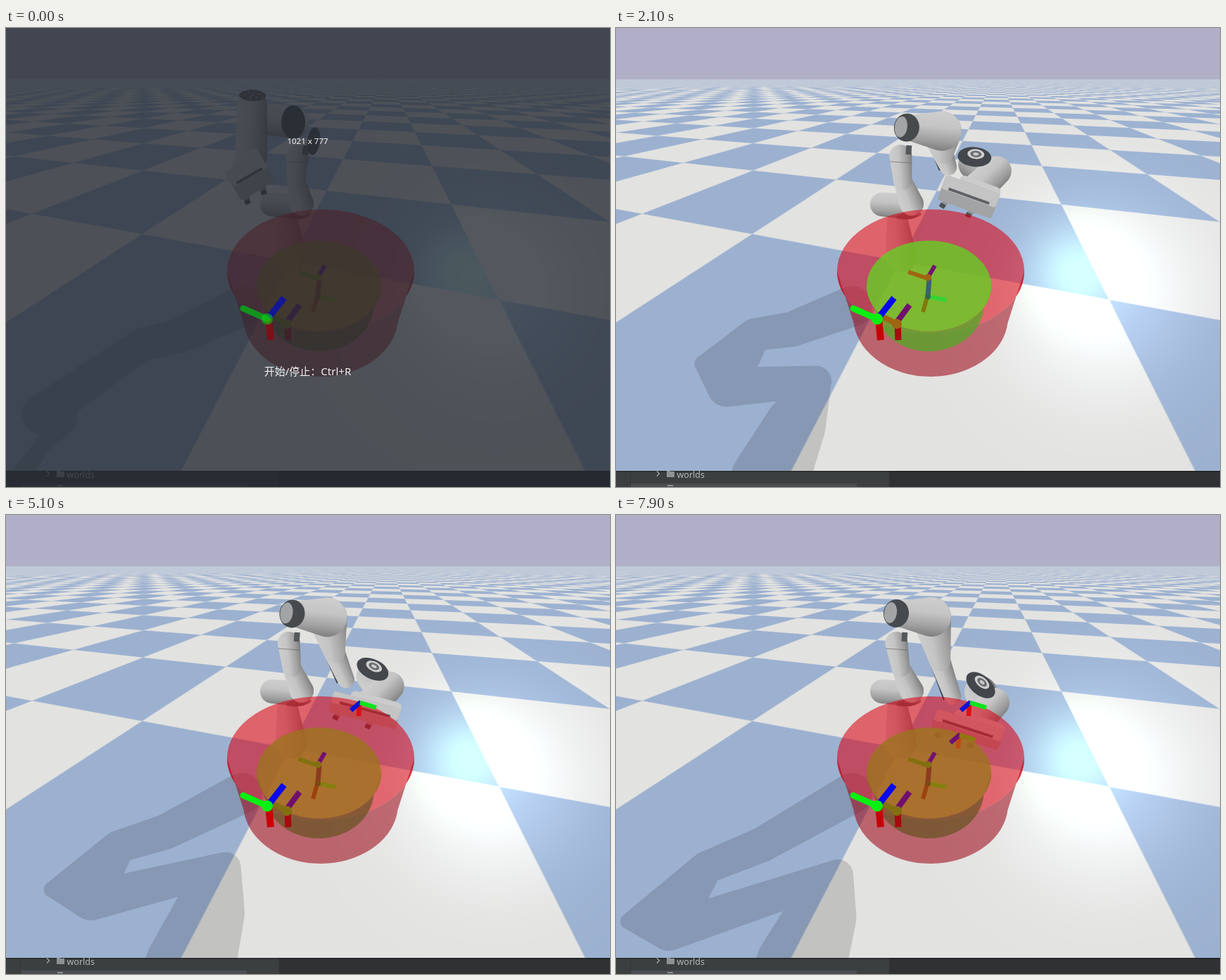
An HTML page with a canvas for the animation above (8 s loop, 858 px wide and 653 px high).

```html
<!DOCTYPE html>
<html lang="en">
<head>
<meta charset="utf-8">
<title>Robot arm</title>
<style>
html, body { margin: 0; width: 100%; height: 100%; overflow: hidden; background: #2f3132; }
canvas { display: block; width: 858px; height: 653px; }
</style>
</head>
<body>
<canvas id="stage" width="858" height="653"></canvas>
<script>
const W = 858, H = 653, FLOOR_END = 630, LOOP = 8000, REACH = 3900, TOUCH = 5800;
const ctx = document.getElementById('stage').getContext('2d');

// Key points; the rest of the arm follows from them.
// lid: x, y, degrees. hand: x, y, degrees, half length.
const poses = [
  { t: 0, cap: [437, 161], tip: [350, 108], lid: [408, 134, 90], hand: [347, 212, -30, 28],
    shade: { tip: [115, 500], bend: [50, 550], wrist: [80, 555], foot: [15] } },
  { t: 700, cap: [386, 132], tip: [418, 116], lid: [446, 166, 105], hand: [372, 213, 29, 22],
    shade: { tip: [145, 480], bend: [65, 545], wrist: [130, 520], foot: [85] } },
  { t: 1550, cap: [406, 143], tip: [516, 173], lid: [477, 160, 175], hand: [456, 226, 37, 23],
    shade: { tip: [132, 468], bend: [125, 535], wrist: [232, 530], foot: [125] } },
  { t: 2800, cap: [416, 141], tip: [552, 217], lid: [524, 194, 190], hand: [521, 248, 12, 49],
    shade: { tip: [118, 482], bend: [172, 500], wrist: [308, 490], foot: [260] } },
  { t: 7900, cap: [398, 140], tip: [538, 267], lid: [518, 242, 220], hand: [499, 306, 18, 50],
    shade: { tip: [17, 578], bend: [75, 592], wrist: [315, 512], foot: [262] } }
];
const eases = [f => f, f => f, f => 1 - (1 - f) ** 2, f => f ** .8];

const mix = (a, b, f) => a + (b - a) * f;
const between = (a, b, f) => [mix(a[0], b[0], f), mix(a[1], b[1], f)];
const move = (p, x, y) => [p[0] + x, p[1] + y];
const clamp = v => Math.max(0, Math.min(1, v));
const fract = v => v - Math.floor(v);
const rad = deg => deg * Math.PI / 180;

function blend(a, b, f) {
  if (Array.isArray(a)) return a.map((v, n) => mix(v, b[n], f));
  if (typeof a === 'number') return mix(a, b, f);
  return Object.fromEntries(Object.keys(a).map(k => [k, blend(a[k], b[k], f)]));
}

function poseAt(t) {
  let i = 0;
  while (i < poses.length - 2 && t >= poses[i + 1].t) i++;
  const a = poses[i], b = poses[i + 1];
  return blend(a, b, eases[i](clamp((t - a.t) / (b.t - a.t))));
}

// Screen point to floor tile coordinates
function toTile(x, y) {
  const a = 109.8 + .1064 * x, b = 205 - .3796 * x, c = -7.13 + .1064 * y, d = 25.43 - .3796 * y;
  const p = x - 455, q = y - 231, det = a * d - b * c;
  return [(p * d - b * q) / det, (a * q - p * c) / det];
}

// One axis of a checker pattern, averaged over width w
function band(p, w) {
  const tri = v => Math.abs(fract(v * .5) - .5);
  return 2 * (tri(p - w / 2) - tri(p + w / 2)) / w;
}

function makeFloor() {
  const layer = document.createElement('canvas');
  layer.width = W;
  layer.height = FLOOR_END;
  const g = layer.getContext('2d'), img = g.createImageData(W, FLOOR_END);
  const sky = [177, 175, 199], light = [226, 226, 224], blue = [156, 177, 208];
  const core = [32, 56, 32], halo = [32, 36, 40];
  for (let y = 0; y < FLOOR_END; y++) for (let x = 0; x < W; x++) {
    const o = (y * W + x) * 4;
    img.data[o + 3] = 255;
    if (y < 73) {
      sky.forEach((v, n) => img.data[o + n] = v);
      continue;
    }
    const p = toTile(x, y), px = toTile(x + 1, y), py = toTile(x, y + 1);
    const size = n => Math.abs(px[n] - p[n]) + Math.abs(py[n] - p[n]) + .002;
    const k = .5 - .5 * band(p[0], size(0)) * band(p[1], size(1));
    const near = Math.exp(-((x - 652) ** 2 + (y - 345) ** 2) / 3600);
    const wide = Math.exp(-((x - 695) ** 2 + (y - 375) ** 2) / 18000);
    for (let n = 0; n < 3; n++)
      img.data[o + n] = mix(light[n], blue[n], k) + core[n] * near + halo[n] * wide;
  }
  g.putImageData(img, 0, 0);
  return layer;
}
const floor = makeFloor();

// Adds a rounded, tapered bar to the current path
function addLimb([x1, y1], r1, [x2, y2], r2) {
  const d = Math.hypot(x2 - x1, y2 - y1) || 1, a = Math.atan2(y2 - y1, x2 - x1);
  const b = Math.acos(Math.max(-1, Math.min(1, (r1 - r2) / d)));
  ctx.moveTo(x1 + r1 * Math.cos(a + b), y1 + r1 * Math.sin(a + b));
  ctx.arc(x1, y1, r1, a + b, a + 2 * Math.PI - b);
  ctx.arc(x2, y2, r2, a - b, a + b);
  ctx.closePath();
}

function limb(p, r1, q, r2) {
  const d = Math.hypot(q[0] - p[0], q[1] - p[1]) || 1, r = Math.max(r1, r2);
  let nx = (p[1] - q[1]) / d * r, ny = (q[0] - p[0]) / d * r;
  if (nx + ny > 0) { nx = -nx; ny = -ny; }
  const [mx, my] = between(p, q, .5);
  const g = ctx.createLinearGradient(mx + nx, my + ny, mx - nx, my - ny);
  g.addColorStop(0, '#cecece');
  g.addColorStop(.4, '#c4c4c4');
  g.addColorStop(.75, '#a0a0a0');
  g.addColorStop(1, '#7e7e7e');
  ctx.fillStyle = g;
  ctx.beginPath();
  addLimb(p, r1, q, r2);
  ctx.fill();
}

function oval(color, x, y, rx, ry, deg = 0) {
  ctx.fillStyle = color;
  ctx.beginPath();
  ctx.ellipse(x, y, rx, ry, rad(deg), 0, 2 * Math.PI);
  ctx.fill();
}

function rod(color, width, x1, y1, x2, y2, cap = 'butt') {
  ctx.strokeStyle = color;
  ctx.lineWidth = width;
  ctx.lineCap = cap;
  ctx.beginPath();
  ctx.moveTo(x1, y1);
  ctx.lineTo(x2, y2);
  ctx.stroke();
}

function box(color, x, y, w, h, r = 0) {
  ctx.fillStyle = color;
  ctx.beginPath();
  ctx.roundRect(x, y, w, h, r);
  ctx.fill();
}

function drawShadow({ tip, bend, wrist, foot }) {
  const root = [335, 396], mid = between(root, tip, .4), elbow = move(between(root, tip, .65), 0, -13);
  const end = [foot[0], 645], spread = 12 + foot[0] / 5;
  ctx.fillStyle = 'rgba(0,0,0,.14)';
  ctx.beginPath();
  addLimb(root, 29, mid, 25);
  addLimb(mid, 25, elbow, 23);
  addLimb(elbow, 23, tip, 11);
  addLimb(elbow, 23, bend, 28);
  addLimb(tip, 11, bend, 28);
  addLimb(bend, 28, wrist, 22);
  const palm = between(wrist, end, .45);
  addLimb(wrist, 22, palm, spread * .78);
  addLimb(palm, spread * .78, end, spread);
  ctx.fill();
}

function drawBase() {
  limb([400, 276], 15, [405, 325], 22);
  limb([421, 250], 16, [414, 257], 15);
  limb([378, 251], 17, [416, 254], 18);
  oval('rgba(70,70,70,.5)', 416, 267, 18, 5, -8);
}

function drawHand([x, y, deg, half]) {
  const h = 36 - .4 * half;
  ctx.save();
  ctx.translate(x, y);
  ctx.rotate(rad(deg));
  box('#cbcbcb', -.5 * half, -h - 8, 1.5 * half, h + 8, 7);
  for (const f of [-.74, .22]) {
    rod('#929394', 8, f * half + 3, h - 6, f * half, h + 3, 'round');
    rod('#4c4f51', 8, f * half, h + 1, f * half - 1, h + 7);
  }
  box('#a2a3a4', -half, -h, 2 * half, 2 * h - 2, 4);
  box('#c4c4c4', -half, -h, 2 * half, h + 1, 4);
  rod('#5f6266', 4, -.75 * half, -2, .75 * half, -2);
  ctx.restore();
}

function drawArm({ cap, tip, lid, hand }, t) {
  const open = clamp((t - 700) / 850);
  const neck = [404 + .4 * (cap[0] - 412), 182], waist = move(between(neck, [410, 250], .52), 0, 0);
  limb(waist, 13, [420, 250], 17);
  limb(neck, 16, waist, 13);
  rod('rgba(90,90,90,.6)', 1, neck[0] - 15, 190, neck[0] + 15, 192);
  rod('#55585b', 8, neck[0] + 12, 167, neck[0] + 11, 180);

  // Upper arm, bending at the knee
  const elbow = move(cap, 50 * open, 5 * open), bulge = mix(9, 28, open);
  const end = move(between(lid, hand, .25), -35, 0);
  const knee = move(between(elbow, end, .5), -3, 6);
  if (open) {
    rod('#44484b', 7, knee[0] - 12, knee[1], end[0] - 10, end[1] + 4);
    limb(knee, 15 * open, end, 12 * open);
    limb(elbow, bulge, knee, 15 * open);
  }
  limb(cap, mix(9, 17, open), elbow, bulge);
  oval('#464a4d', cap[0], cap[1], mix(9, 18, open), 20, 8);
  ctx.globalAlpha = open;
  oval('#a2a4a5', cap[0] - 8, cap[1] - 1, 9, 15, 8);
  ctx.globalAlpha = 1;

  // Wrist and its two dark faces
  limb(move(lid, 0, 10 * open), 23, between(tip, hand, .2), 21);
  limb(tip, 21, between(tip, hand, .7), 23);
  ctx.save();
  ctx.globalAlpha = 1 - open;
  ctx.translate(...tip);
  ctx.rotate(Math.atan2(hand[1] - tip[1], hand[0] - tip[0]) - Math.PI / 2);
  oval('#585a5b', 0, -12, 19, 8);
  for (let n = 0; n < 9; n++) {
    const a = n * 2.4, r = Math.sqrt(n / 9);
    oval('#a9abab', Math.cos(a) * r * 15, Math.sin(a) * r * 6 - 12, 1.3, .8);
  }
  ctx.restore();
  oval('#43474b', lid[0], lid[1], 24, mix(17, 14, open), lid[2]);
  ctx.globalAlpha = open;
  ['#d0d0d0', '#6a6d70', '#c8c8c8'].forEach((c, n) =>
    oval(c, lid[0] + 2, lid[1] - 4, 12 - 4 * n, 7 - 2.4 * n, lid[2]));
  ctx.globalAlpha = 1;
  drawHand(hand);
}

function drum(wall, top, [x, y, rx, ry], [yb, rxb, ryb]) {
  ctx.fillStyle = wall;
  ctx.beginPath();
  ctx.ellipse(x, y, rx, ry, 0, 0, Math.PI);
  ctx.ellipse(x, yb, rxb, ryb, 0, Math.PI - .1, .1, true);
  ctx.closePath();
  ctx.fill();
  oval(top, x, y, rx, ry);
}

function drawDrums(amber) {
  drum('rgba(155,5,20,.56)', 'rgba(219,0,17,.56)', [447, 346, 133, 88], [411, 110, 85]);
  const colors = amber ? ['rgba(106,85,37,.75)', 'rgba(157,117,31,.8)'] : ['rgba(80,170,35,.75)', 'rgba(102,207,35,.8)'];
  drum(...colors, [444.5, 367, 88.5, 64.5], [393, 78, 67]);
}

function mainAxes() {
  rod('#c80008', 10, 373, 414, 376, 444);
  rod('#0808ee', 9, 373, 412, 395, 384);
  rod('#08f010', 9, 337, 399, 371, 414, 'round');
  oval('#08f010', 371, 414, 8, 8);
}

// Small frame of three rods: red down, blue left, green right
function triad(x, y, red, blue, green) {
  rod(red, 6.5, x + 1, y, x, y + 16);
  rod(blue, 6.5, x + 3, y - 4, x - 11, y + 8);
  rod(green, 6.5, x + 2, y - 3, x + 25, y + 4);
}

function drawAxes(amber, t) {
  const pick = (a, b) => amber ? a : b, tan = pick('#827010', '#a06412');
  rod('#a80810', 9, 400, 420, 401, 444);
  rod('#70106e', 8, 400, 417, 417, 394);
  rod(tan, 8, 372, 407, 399, 421);
  oval(tan, 399, 421, 7, 7);
  mainAxes();
  rod(pick('#8a3c20', '#3a5f78'), 7, 445, 357, 443, 381);
  rod('#741074', 6, 443, 355, 453, 338);
  rod(tan, 6, 415, 347, 442, 356);
  oval(tan, 443, 355, 5, 5);
  rod(pick('#9c420e', '#82780e'), 6, 442, 383, 436, 404);
  rod(pick('#85800f', '#35d435'), 6, 443, 382, 469, 387);
  oval(pick('#7a4a14', '#36654a'), 443, 382, 4, 4);
  if (t >= REACH) triad(501, 270, '#e00c14', '#0a12d4', '#0ce41c');
  if (t >= TOUCH) triad(486, 316, '#c24a0c', '#6c1076', '#8f7a10');
}

function drawPanel() {
  box('#2f3132', 0, FLOOR_END, W, 23);
  box('#3c3f40', 0, FLOOR_END, 388, 23);
  box('#4b4e50', 21, 648, 321, 5);
  box('#323435', 20, FLOOR_END, 1, 23);
  box('rgba(0,0,0,.25)', 0, FLOOR_END, W, 2);
  rod('#a5a9ab', 1.3, 58, 630.5, 61.5, 634);
  rod('#a5a9ab', 1.3, 61.5, 634, 58, 637.5);
  box('#8d9295', 72, 630, 5, 2);
  box('#8d9295', 72, 631, 11, 8);
  box('#8d9295', 73, 650, 8, 2);
  ctx.fillStyle = '#b4b7b9';
  ctx.font = '12.5px "Noto Sans", "Open Sans", sans-serif';
  ctx.textAlign = 'left';
  ctx.fillText('worlds', 86.5, 639.5);
}

function drawDim() {
  box('rgba(36,41,48,.775)', 0, 0, W, H);
  ctx.globalAlpha = .4;
  mainAxes();
  ctx.globalAlpha = 1;
  ctx.fillStyle = '#f2f2f2';
  ctx.textAlign = 'center';
  ctx.font = '11.5px "Noto Sans", "Open Sans", sans-serif';
  ctx.fillText('1021 x 777', 428.5, 165);
  ctx.font = '15px "Noto Sans", "Noto Sans CJK SC", "Noto Sans CJK", sans-serif';
  ctx.fillText('开始/停止：Ctrl+R', 428.5, 494);
}

function stepTime(t) {
  if (t < 100) return t < 50 ? 0 : 50;
  if (t >= 1550 && t < 1700) return 1550;
  return Math.floor(t / 100) * 100;
}

function draw(now) {
  const t = stepTime(now % LOOP), pose = poseAt(t), amber = t < 50 || t >= REACH;
  ctx.drawImage(floor, 0, 0);
  drawShadow(pose.shade);
  drawBase();
  drawArm(pose, t);
  drawDrums(amber);
  drawAxes(amber, t);
  drawPanel();
  if (t < 50) drawDim();
  requestAnimationFrame(draw);
}
requestAnimationFrame(draw);
</script>
</body>
</html>
```
